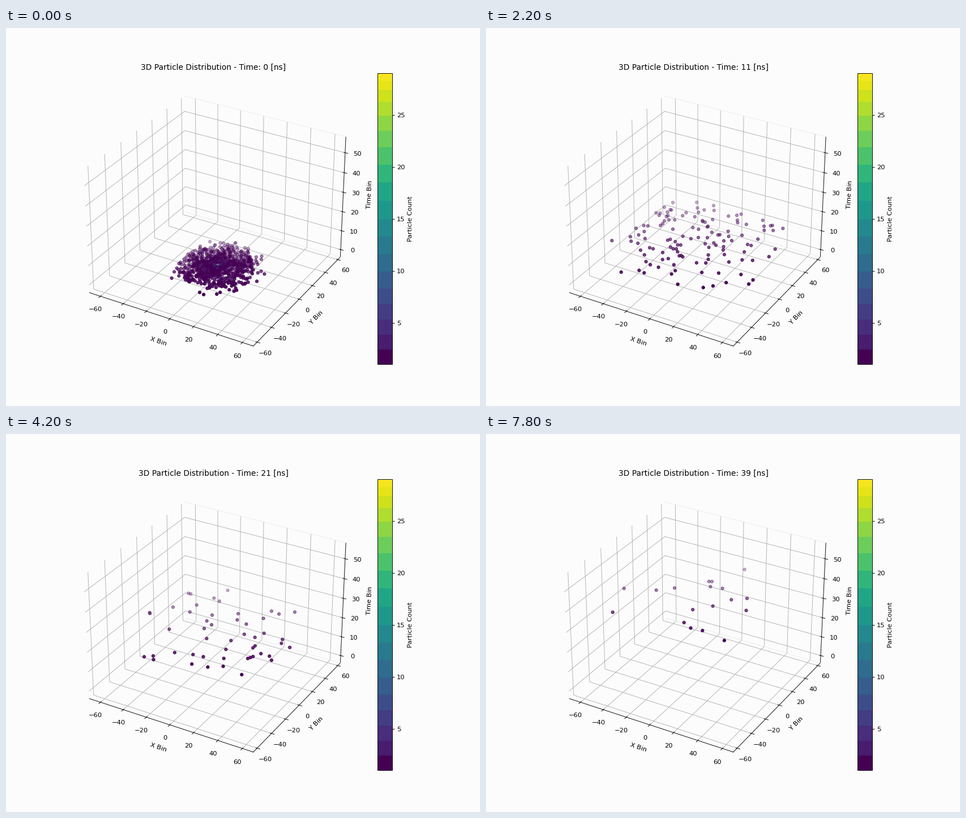
Animation, 837 px wide and 669 px high, one loop 8000 ms. Source, as a matplotlib script:

```python
import numpy as np
import matplotlib.pyplot as plt
from matplotlib.animation import FuncAnimation
from matplotlib.cm import ScalarMappable
from matplotlib.colors import ListedColormap, Normalize

W, H, DPI = 837, 669, 82.7
FRAMES, INTERVAL = 40, 200
BG = "#fcfcfc"


def stepped_viridis(bands=20):
    """Viridis in flat bands, narrower towards the bright end."""
    u = np.linspace(0, 1, bands + 1)
    edges = u + u**3 * (1 - u)
    mids = (edges[:-1] + edges[1:]) / 2
    mids[0], mids[-1] = 0, 1
    band = np.digitize(np.linspace(0, 1, 512), edges[1:-1])
    return ListedColormap(plt.get_cmap("viridis")(mids[band]))


def padded(lo, hi):
    mid, half = (lo + hi) / 2, (hi - lo) / 2 * 1.1 * 25 / 24
    return mid - half, mid + half


def cloud(t):
    """Decaying cloud that spreads from a dense core to an even disc."""
    rng = np.random.default_rng(100 + t)
    n = int(min(1050, 2200 / (t + 1.2) * np.exp(-t / 40)))
    radius = 30 + 34 * (1 - np.exp(-t / 1.2))
    power = .5 + .65 * np.exp(-(t / 7) ** 2)
    r = radius * rng.random(n) ** power * rng.lognormal(0, .12, n)
    a = rng.uniform(0, 2 * np.pi, n)
    x, y = r * np.cos(a) - 1, r * np.sin(a) + 1
    keep = (r < 70) & (abs(x + .5) < 60.5) & (abs(y + .5) < 56.5)
    hits = np.round(np.column_stack([x, y])[keep])
    return np.unique(hits, axis=0, return_counts=True)


cmap, norm = stepped_viridis(), Normalize(1, 29)

# The small excess keeps the pixel size from being rounded down
fig = plt.figure(figsize=((W + .01) / DPI, (H + .01) / DPI), dpi=DPI, facecolor=BG)
ax = fig.add_subplot(projection="3d", facecolor=BG)
fig.colorbar(ScalarMappable(norm, cmap), ax=ax, label="Particle Count")

xlim, ylim, zlim = padded(-61, 60), padded(-57, 56), padded(0, 54)
for z in zlim:
    ax.plot(xlim, [ylim[1]] * 2, [z] * 2, color="#ececec", lw=.8)
ax.set(xlim=xlim, ylim=ylim, zlim=zlim,
       xlabel="X Bin", ylabel="Y Bin", zlabel="Time Bin")
for axis in (ax.xaxis, ax.yaxis, ax.zaxis):
    axis.set_pane_color((1, 1, 1, 0))

points = None


def update(t):
    global points
    if points is not None:
        points.remove()
    bins, counts = cloud(t)
    points = ax.scatter(bins[:, 0], bins[:, 1], np.full(len(bins), t),
                        c=counts, cmap=cmap, norm=norm, marker="o")
    ax.set_title(f"3D Particle Distribution - Time: {t} [ns]")
    return [points]


anim = FuncAnimation(fig, update, frames=FRAMES, interval=INTERVAL, repeat=True)
plt.show()
```
